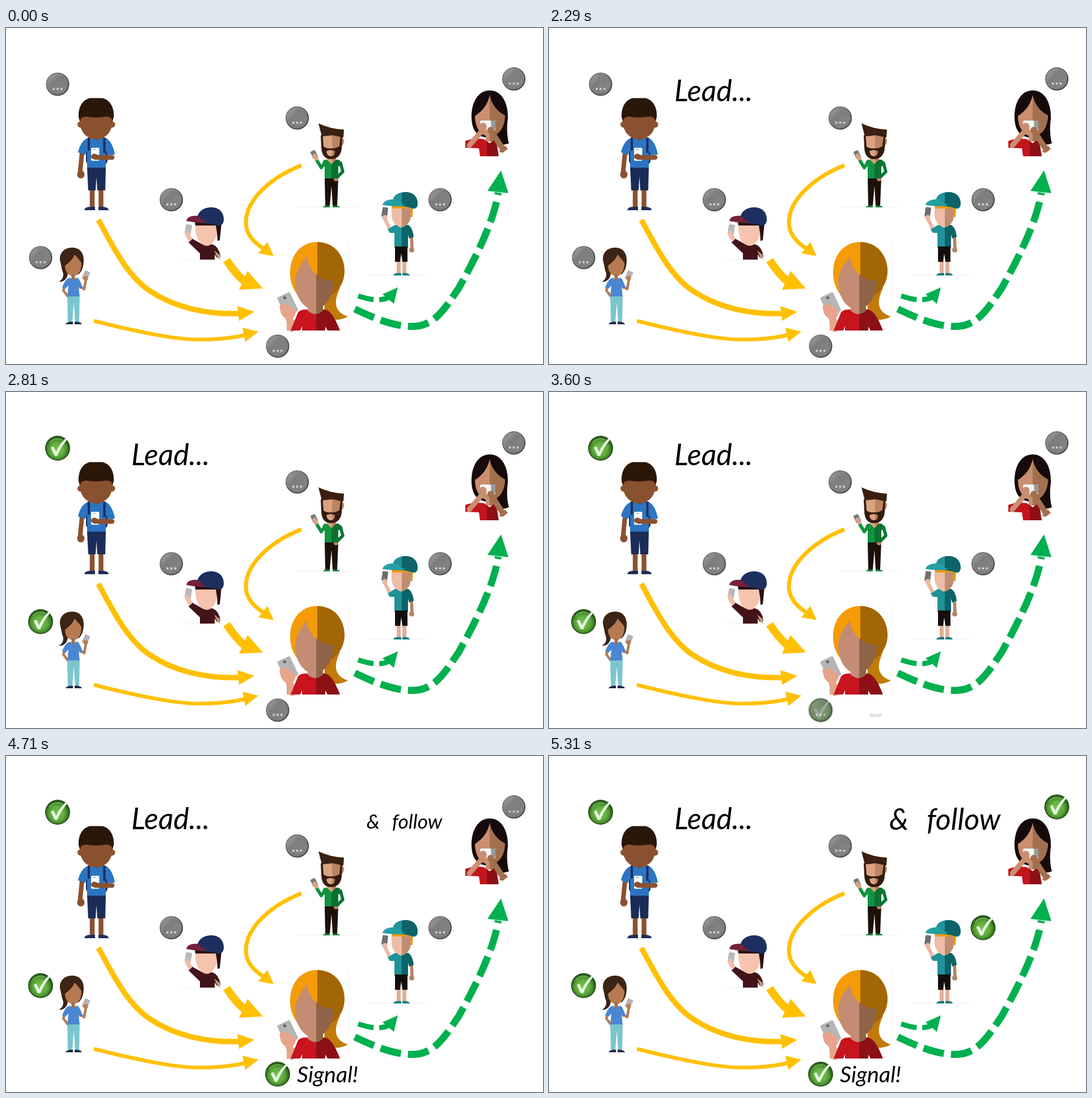
These frames come from a looping animation (947 by 592 pixels, 6.06 s). An HTML page:

```html
<!DOCTYPE html>
<html lang="en">
<head>
<meta charset="utf-8">
<title>Lead and follow</title>
<style>
html, body { margin: 0; width: 100%; height: 100%; overflow: hidden; background: #fff; }
svg { display: block; width: 100vw; height: 100vh; }
text { font: italic 52px Lato, "Open Sans", sans-serif; fill: #000; }
.line { fill: none; stroke-linecap: butt; }
.limb { fill: none; stroke-linecap: round; stroke-linejoin: round; }
</style>
</head>
<body>
<svg viewBox="0 0 947 592" xmlns="http://www.w3.org/2000/svg">
<defs id="defs">
  <linearGradient id="rim" x1="0" y1="0" x2="1" y2="1">
    <stop offset="0" stop-color="#8e8e8e"/><stop offset=".5" stop-color="#5c5c5c"/><stop offset="1" stop-color="#3c3c3c"/>
  </linearGradient>
  <linearGradient id="face" x1="0" y1="0" x2="1" y2="1">
    <stop offset="0" stop-color="#a6a6a6"/><stop offset=".35" stop-color="#7d7d7d"/><stop offset="1" stop-color="#868686"/>
  </linearGradient>
  <radialGradient id="leaf" cx=".48" cy=".55" r=".52">
    <stop offset="0" stop-color="#7cc455"/><stop offset=".6" stop-color="#5fab3c"/><stop offset=".82" stop-color="#458a2b"/><stop offset="1" stop-color="#2c5a1c"/>
  </radialGradient>
  <g id="wait">
    <circle r="20.6" fill="url(#rim)"/>
    <circle r="17.6" fill="none" stroke="#9a9a9a" stroke-width="1.2"/>
    <circle r="16.6" fill="url(#face)"/>
    <path d="M-8.500 6.500h3.400v3.400h-3.400zM-1.700 6.500h3.400v3.400h-3.400zM5.100 6.500h3.400v3.400h-3.400z" fill="#d2d2d2"/>
  </g>
  <g id="done">
    <circle r="22" fill="#2b521d"/>
    <circle r="20.300" fill="url(#leaf)"/>
    <path d="M-14 -9A17 17 0 0 1 9 -14" fill="none" stroke="#93d075" stroke-width="2" opacity=".6"/>
    <path d="M-12 -1L-7.500 -3.500L-2.500 6.500C2 -4 8 -12 15 -18L18 -16.500C10 -7 4 2 -.5 13.500H-5Z" fill="#e4f7e1"/>
  </g>
</defs>

<g class="line" stroke="#ffc000">
  <path d="M163 338C186 380 213 437 255 464C295 491 350 505 411 503" stroke-width="9.500"/>
  <path d="M155 516C230 535 300 549 340 549C370 549 400 546 421 541" stroke-width="6.500"/>
  <path d="M521 242C470 262 424 300 423 342C423 362 435 377 455 389" stroke-width="7"/>
  <path d="M389 409C398 423 408 437 424 449" stroke-width="14"/>
</g>
<path d="M408 490L438 500L411 516ZM417 528L445 535L422 553ZM461 377L472 402L445 397ZM426 428L453 459L411 461Z" fill="#ffc000"/>
<g class="line" stroke="#00b050">
  <path d="M615 495C650 512 690 528 722 525.500C758 523 775 492 798 459C822 416 860 345 868 290" stroke-width="12.400" stroke-dasharray="37.200 12.400"/>
  <path d="M621 472C645 480 662 482 678 473" stroke-width="9" stroke-dasharray="28 10"/>
</g>
<path d="M873 251L886 291L849 287ZM691 457L684 486L664 469Z" fill="#00b050"/>
<path d="M513 315.500H620M640 435.500H743M310 408.500H380M604.500 377V533" stroke="#f1f1f1"/>

<!-- backpack boy -->
<g>
  <rect x="141" y="193" width="38" height="47" rx="6" fill="#1d2c59"/>
  <path d="M152 285V317M167.500 285V317" stroke="#8a5130" stroke-width="8.500"/>
  <path class="limb" d="M134 220L130.500 256" stroke="#8a5130" stroke-width="8"/>
  <ellipse cx="132" cy="258" rx="6.500" ry="7" fill="#8a5130"/>
  <path d="M144 194H176C184 197 190 210 192 223L180 224L176 216V247H143V216L139 224L127 219C130 206 136 197 144 194Z" fill="#2b75c2"/>
  <path d="M146 193V216M173.500 193V220" stroke="#1d2c59" stroke-width="4"/>
  <path d="M152 192H167Q160 203 152 192Z" fill="#7a4526"/>
  <path d="M143 246H176L175 286H161L159.500 262L158 286H145Z" fill="#1c2c59"/>
  <path d="M138 321Q139 315 149 315H157V321ZM163 321V315H171Q181 316 181 321Z" fill="#1c2c59"/>
  <rect x="150" y="211" width="14.500" height="23" rx="2" fill="#f6f8fb"/>
  <rect x="154" y="213" width="4" height="1.500" fill="#9aa6b8"/>
  <path class="limb" d="M187 228H158" stroke="#8a5130" stroke-width="8.500"/>
  <ellipse cx="156" cy="226.500" rx="6" ry="5" fill="#8a5130"/>
  <path d="M128 157C127 138 136 126 148 123.500H170C182 126 191 138 190 157L185 174H133Z" fill="#2b1707"/>
  <circle cx="131.500" cy="170" r="5.500" fill="#8a5130"/><circle cx="187" cy="170" r="5.500" fill="#8a5130"/>
  <path d="M131 163Q132 156 142 156Q159 159 176 156Q187 156 187 163C189 183 175 196 159 196S129 183 131 163Z" fill="#8a5130"/>
</g>

<!-- ponytail girl -->
<g>
  <path d="M95 408C95 394 104 387 117 387S137 396 137 409C137 420 134 429 128 434L109 428C110 438 105 448 93 447C101 443 103 435 99 427Z" fill="#3c2417"/>
  <path d="M104 419C110 414 118 408 121 399C126 406 132 410 133 415C133 428 127 437 119 437S104 430 104 419Z" fill="#b67b50"/>
  <path d="M118.500 434V446" stroke="#a56c44" stroke-width="6"/>
  <path class="limb" d="M105 452L101 462L109 473M131 456L138 460L141 443" stroke="#b67b50" stroke-width="4.500"/>
  <rect x="136" y="428" width="10" height="16" rx="1.500" fill="#b3b3b5" transform="rotate(25 141 436)"/>
  <circle cx="140.500" cy="441" r="4" fill="#b67b50"/>
  <path d="M109 441L114 440L118.500 446L123 440L128 441Q132 448 135 457L130 460L128 455L130 474H108L110 454L104 460L99 457Q103 446 109 441Z" fill="#4a87d1"/>
  <path d="M108 473H130L129 518H122L119.500 484L117 518H109Z" fill="#7bc6cd"/>
  <path d="M105 522Q107 517 118 517.500V522ZM121 522V517.500Q132 517 134 522Z" fill="#1c2748"/>
</g>

<!-- cap boy, bust -->
<g>
  <path d="M371 344H380L377 374L373 375Z" fill="#2a1013"/>
  <path d="M342 408V397L322 378L328 371L346 381H362C371 382 377 392 378 403L372 405L368 399V408Z" fill="#43131a"/>
  <path d="M367 392L373 405L377 408V400Z" fill="#c39a84"/>
  <rect x="316" y="346" width="11" height="18" rx="2" fill="#b9b9ba" transform="rotate(10 321 355)"/>
  <path class="limb" d="M324 371L319 362" stroke="#f0bda8" stroke-width="8"/>
  <path d="M348 378H361V382Q354 386 348 382Z" fill="#dba591"/>
  <path d="M334 345H372V362C369 378 360 383 353 383C341 383 333 369 334 345Z" fill="#f5c3ae"/>
  <path d="M333 342H377L372 360L370 348H334Z" fill="#2a1013"/>
  <path d="M337 338C337 323 349 316 362 316C377 316 385 326 384 339C383 346 379 349 374 348C360 344 350 344 337 343Z" fill="#1d2f5e"/>
  <path d="M318 340C319 333 328 330 338 331L353 343Q335 344 318 340Z" fill="#772039"/>
</g>

<!-- bearded man -->
<g>
  <path d="M562 264H586L584 313H576L574 278L571 313H563Z" fill="#1d1009"/>
  <path d="M559 316Q560 312 571 312.500V316ZM576 316V312.500Q587 312 589 316Z" fill="#0e7d35"/>
  <path class="limb" d="M590 238L594 253L582 265" stroke="#0a7732" stroke-width="5.500"/>
  <circle cx="582" cy="266" r="4" fill="#b98461"/>
  <path class="limb" d="M562 238L556 246L548 233" stroke="#129340" stroke-width="6"/>
  <rect x="539" y="216" width="9" height="14" rx="1.500" fill="#77797c" transform="rotate(-25 543 223)"/>
  <path class="limb" d="M547 230L544 225" stroke="#dba27f" stroke-width="7"/>
  <path d="M562 232H586Q591 234 592 241L586 244V265H562V243L558 240Q558 234 562 232Z" fill="url(#green)"/>
  <path d="M566 226H582V232L574 240L566 232Z" fill="url(#tan)"/>
  <path d="M557 189H593V194Q598 195 595 204L591 210C591 222 584 230 573 230S558 222 557 208Z" fill="url(#tan)"/>
  <path d="M555 189H558.500L560 209Q567 213 572 212Q582 213 588 208L590 191H593L592 212C591 224 584 231 573 231C562 231 556 223 556 209Z" fill="#321b0f"/>
  <path d="M565 217Q573 213 580 217Q580 226 573 226T565 217Z" fill="url(#tan)"/>
  <path d="M551 168Q572 178 596 179L595 193L576 189L557 191Z" fill="#3b1f12"/>
</g>

<!-- woman holding a phone sideways -->
<g>
  <path d="M821 160C820 130 833 110 853 110C875 110 886 133 885 160C882 180 885 197 887 203C877 208 867 205 858 196L835 190C825 182 822 174 821 160Z" fill="#160a0a"/>
  <path d="M846 178H862V200H846Z" fill="url(#cocoa)"/>
  <path d="M853 118C856 134 866 147 880 154C880 176 868 191 853 191S827 176 827 155C840 147 850 134 853 118Z" fill="url(#cocoa)"/>
  <path d="M810 199Q826 193 843 196L853 203L864 195L869 226H836L834 212L810 211Z" fill="url(#red)"/>
  <rect x="836" y="163" width="27" height="17" rx="2" fill="#f3f3f2"/>
  <path d="M855 163H861Q863 163 863 166V178L856 177Z" fill="#9a9a9c"/>
  <path class="limb" d="M817 207L843 177" stroke="#c98f70" stroke-width="9"/>
  <circle cx="841" cy="173.500" r="6.500" fill="#c98f70"/>
  <path class="limb" d="M876 213L857 184" stroke="#a3704f" stroke-width="10"/>
  <circle cx="855" cy="180" r="6" fill="#a3704f"/>
  <path d="M869 218L880 207L885 213L876 220Z" fill="#a3704f"/>
</g>

<!-- teal cap boy -->
<g>
  <path d="M692.500 408V433M702.500 408V433" stroke="#e0ae98" stroke-width="7"/>
  <path d="M683 436Q684 431 697 432V436ZM699 436V432Q711 431 712 436Z" fill="#117b80"/>
  <path class="limb" d="M715 364L716 389" stroke="#b58165" stroke-width="5.500"/>
  <circle cx="715.500" cy="391" r="4.500" fill="#b58165"/>
  <path class="limb" d="M678 356L668 336" stroke="#eab9a3" stroke-width="6.500"/>
  <rect x="663" y="316" width="10" height="17" rx="1.500" fill="#6e6e70" transform="rotate(8 668 325)"/>
  <circle cx="668" cy="334" r="4.500" fill="#eab9a3"/>
  <path d="M686 347H709C715 350 718 358 719 368L711 371L709 364V387H685V361L677 361L673 355Z" fill="url(#teal)"/>
  <path d="M686 385H708V412H699L697 397L695 412H686Z" fill="#140d0b"/>
  <path d="M690 344H705V348Q697 355 690 348Z" fill="url(#peach)"/>
  <path d="M680 312H718L717 333H713L681 320Z" fill="#f09a13"/>
  <path d="M680 318H714V331C713 343 706 350 697 350C685 350 678 338 680 318Z" fill="url(#peach)"/>
  <path d="M682 305C683 294 693 289 705 289C719 289 727 299 726 311C725 317 722 319 717 318Q699 312 680 314Z" fill="url(#teal)"/>
  <path d="M664 312C665 305 676 301 687 302L704 313Q682 315 664 312Z" fill="#24a0a5"/>
</g>

<!-- central woman -->
<g>
  <path d="M576 462C563 477 558 493 564 505C572 518 593 515 603 508C590 505 580 495 582 480C583 471 586 466 589 457Z" fill="#c27a09"/>
  <path d="M514 470C504 457 501 444 501 431C501 399 521 377 549 377S598 399 597 431C596 447 589 460 576 470Z" fill="url(#hair)"/>
  <path class="limb" d="M497 500L504 529" stroke="#e6a58b" stroke-width="13"/>
  <path d="M495 515H511V533H495Z" fill="#e6a58b"/>
  <path d="M502 533L515 501Q519 496 529 496H562C573 497 582 515 589 533H567L563 526V533H522V525L519 533Z" fill="url(#red2)"/>
  <path d="M532 484H559V498Q546 510 532 498Z" fill="url(#skin)"/>
  <path d="M510 447C512 422 524 414 530 402C532 425 552 445 578 446C577 475 562 496 543 496C525 496 509 472 510 447Z" fill="url(#skin)"/>
  <g transform="rotate(-25 497 486)">
    <rect x="484" y="468" width="25" height="37" rx="3" fill="#b5b5b7"/>
    <circle cx="496.500" cy="474" r="2.800" fill="#66676b"/>
  </g>
  <path d="M482 490Q488 485 495 487L509 496Q513 501 508 509L500 515Q490 512 485 503Z" fill="#e6a58b"/>
</g>

<g id="coins"></g>
<g id="words">
  <text x="221" y="129">Lead...</text>
  <text x="513" y="575" style="font-size:39.5px">Signal!</text>
  <text y="130"><tspan x="600">&amp;</tspan><tspan x="666">follow</tspan></text>
</g>
</svg>
<script>
const LOOP = 6060, STEP = 40, SPAN = 250;
const NS = 'http://www.w3.org/2000/svg';
const $ = id => document.getElementById(id);

function add(parent, tag, attrs) {
  const el = document.createElementNS(NS, tag);
  for (const k in attrs) el.setAttribute(k, attrs[k]);
  return parent.appendChild(el);
}

// Two-tone fill with a sharp vertical split at x.
function split(id, x, left, right) {
  const g = add($('defs'), 'linearGradient', {
    id, gradientUnits: 'userSpaceOnUse', x1: x - .5, x2: x + .5, y1: 0, y2: 0
  });
  add(g, 'stop', { offset: 0, 'stop-color': left });
  add(g, 'stop', { offset: 1, 'stop-color': right });
}
split('green', 574, '#129340', '#0a7030');
split('tan', 575, '#dba27f', '#b98461');
split('cocoa', 853, '#c98f70', '#a3704f');
split('red', 848, '#c4141c', '#8d0f15');
split('teal', 698, '#1f9297', '#0c6468');
split('peach', 698, '#edbda7', '#c08d70');
split('hair', 549, '#f49b07', '#a36605');
split('red2', 547, '#c7141e', '#8c1016');
split('skin', 547, '#c38d73', '#8f6449');

// x, y, start of the turn, first visible step
const coins = [
  [91, 99, 2280, 2290],
  [61, 404.5, 2530, 2570],
  [479, 560.5, 3550, 3560],
  [765.5, 302.5, 4780, 4790],
  [895.5, 89.7, 5030, 5070],
  [291.5, 302.5],
  [513.5, 158.5]
];
const parts = [];
for (const [x, y, start, first] of coins) {
  add($('coins'), 'use', { href: '#wait', x, y });
  if (!start) continue;
  const el = add($('coins'), 'use', { href: '#done' });
  parts.push({ el, x, y, start, first, pose: swivel });
}

// zoom centre x, y, start, first visible step
const zooms = [[305, 124, 1790, 1840], [578, 571, 3550, 3560], [712, 124, 4540, 4590]];
zooms.forEach(([x, y, start, first], i) =>
  parts.push({ el: $('words').children[i], x, y, start, first, pose: zoom }));

const fade = p => Math.min(1, p * 1.6);
function swivel({ x, y }, p) {
  return [`translate(${x} ${y}) scale(${Math.sin(2.5 * Math.PI * p)} 1)`, fade(p)];
}
function zoom({ x, y }, p) {
  return [`translate(${x} ${y}) scale(${p}) translate(${-x} ${-y})`, fade(p)];
}

function draw(now) {
  const t = now % LOOP;
  for (const part of parts) {
    const { el, start, first, pose } = part;
    const shown = t >= first;
    el.setAttribute('visibility', shown ? 'visible' : 'hidden');
    if (!shown) continue;
    const at = first + Math.floor((t - first) / STEP) * STEP;
    const [transform, opacity] = pose(part, Math.min(1, (at - start) / SPAN));
    el.setAttribute('transform', transform);
    el.setAttribute('opacity', opacity);
  }
}
function tick() {
  draw(performance.now());
  requestAnimationFrame(tick);
}
tick();
</script>
</body>
</html>
```
